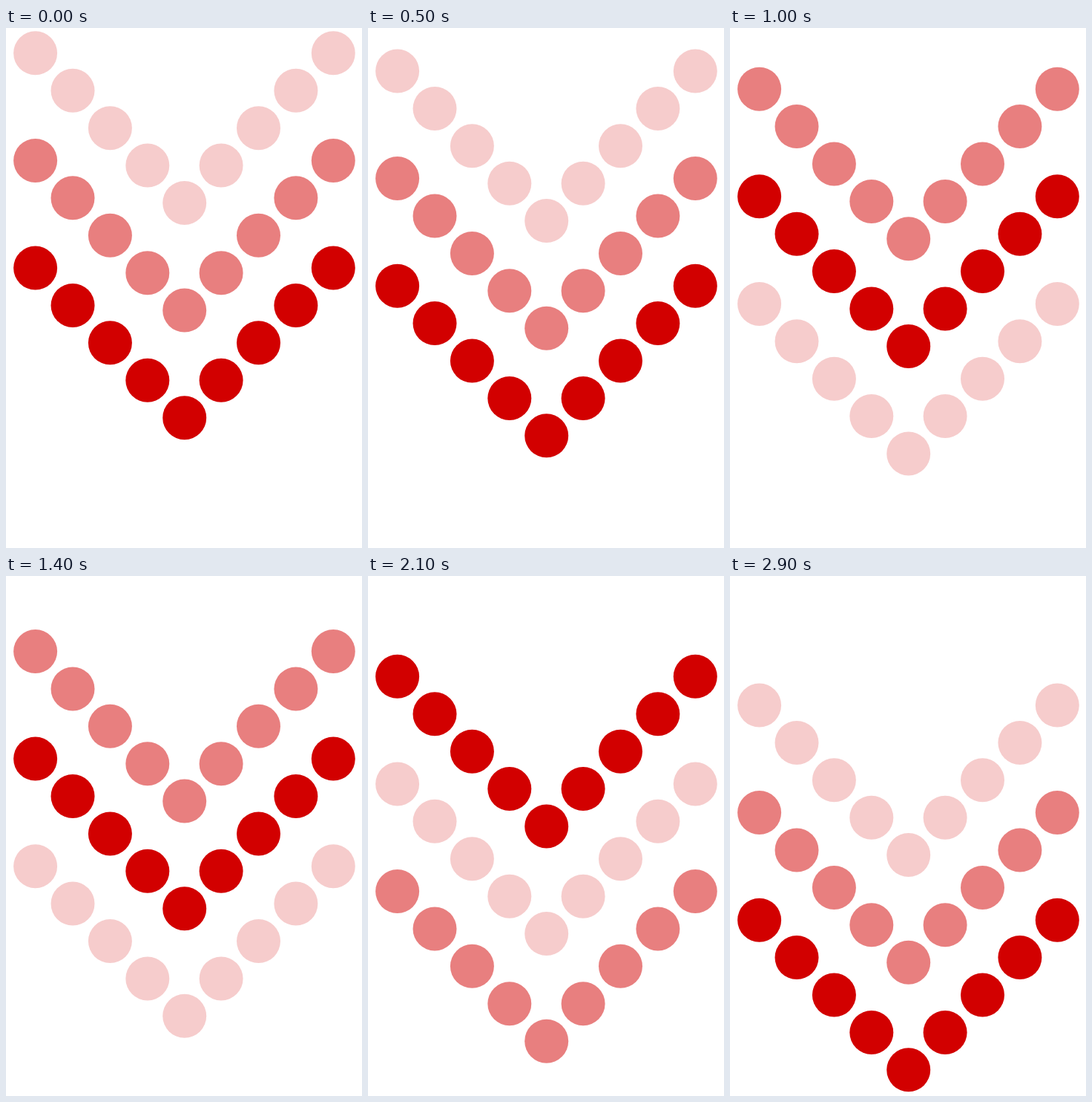
Write an HTML page with a canvas that moves like this. It is 480 by 700 pixels and loops after 3000 ms.

```html
<!DOCTYPE html>
<html lang="en">
<head>
<meta charset="utf-8">
<title>Falling chevrons</title>
<style>
  html, body { margin: 0; width: 100%; height: 100%; overflow: hidden; background: #fff; }
  canvas { display: block; width: 480px; height: 700px; }
</style>
</head>
<body>
<canvas id="stage" width="480" height="700"></canvas>
<script>
const ctx = document.getElementById('stage').getContext('2d');

const LOOP = 3000, TICK = 100, PHASE = 1000;
const ROWS = 3, ROW_GAP = 144.6, DROP = 145;
const RADIUS = 29.5, STEP = 50.4, TOP = 33.85;
const LEFT = 39.6, RIGHT = 441.3, MIDDLE = 240.7;
const FADE_START = 660, FADE_TIME = 100;
const RED = '#d20000';
const ALPHAS = [0.2, 0.5, 1];

function alpha(row, t) {
  const phase = Math.floor(t / PHASE);
  const fade = Math.min(1, Math.max(0, (t % PHASE - FADE_START) / FADE_TIME));
  const from = ALPHAS[(row + phase) % 3];
  const to = ALPHAS[(row + phase + 1) % 3];
  return from + (to - from) * fade;
}

function dot(x, y) {
  ctx.beginPath();
  ctx.arc(x, y, RADIUS, 0, Math.PI * 2);
  ctx.fill();
}

function chevron(y) {
  for (let i = 0; i < 4; i++) {
    dot(LEFT + i * STEP, y + i * STEP);
    dot(RIGHT - i * STEP, y + i * STEP);
  }
  dot(MIDDLE, y + 4 * STEP);
}

function draw(t) {
  ctx.clearRect(0, 0, 480, 700);
  ctx.fillStyle = RED;
  for (let row = 0; row < ROWS; row++) {
    ctx.globalAlpha = alpha(row, t);
    chevron(TOP + row * ROW_GAP + DROP * t / LOOP);
  }
}

const start = performance.now();

function tick() {
  const t = (performance.now() - start) % LOOP;
  draw(Math.floor(t / TICK) * TICK);
  requestAnimationFrame(tick);
}

tick();
</script>
</body>
</html>
```
